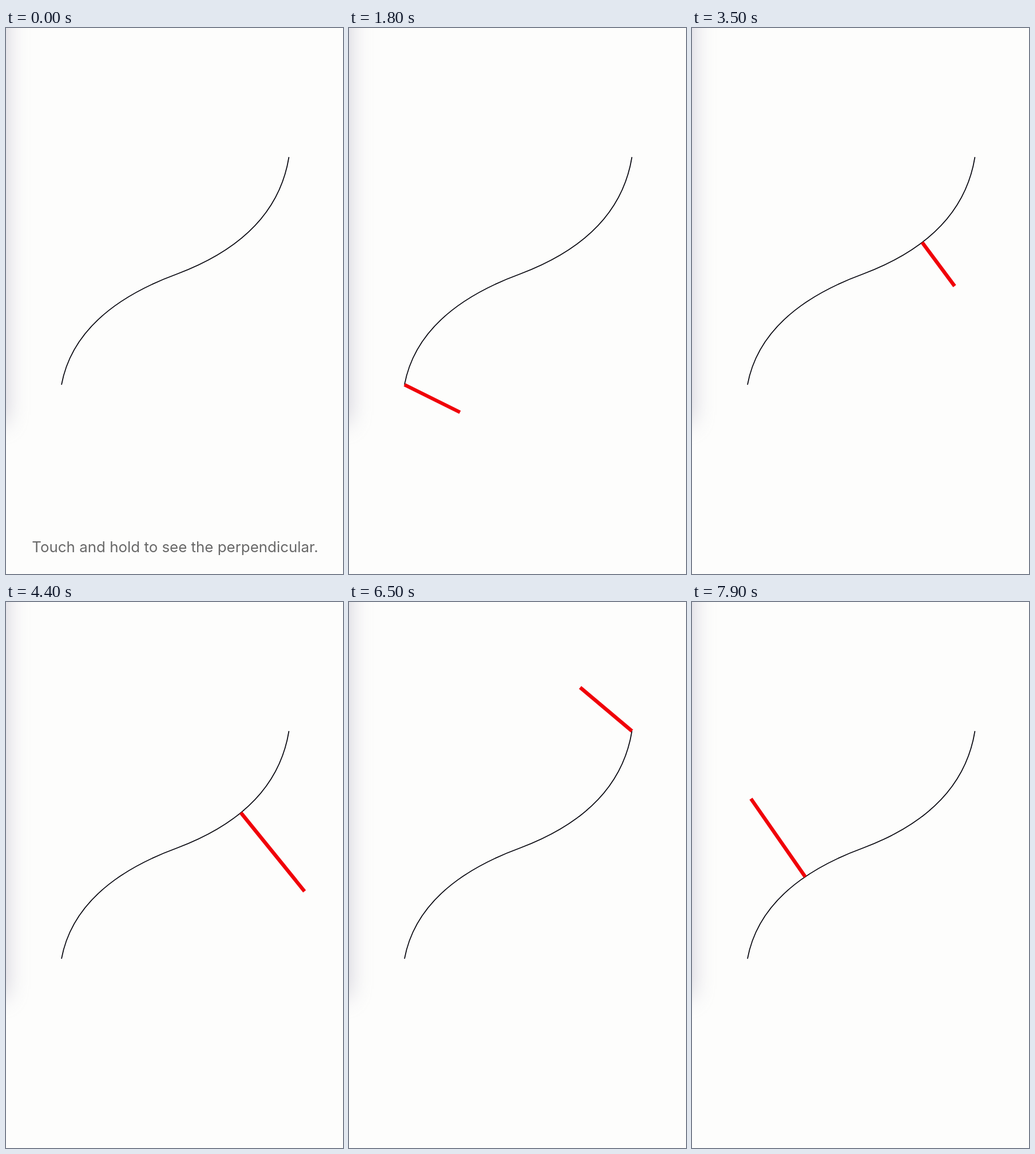
Write an HTML page that moves like this. It is 589 px wide and 952 px high and loops after 8 s.

```html
<!DOCTYPE html>
<html lang="en">
<head>
<meta charset="utf-8">
<title>Perpendicular to a curve</title>
<style>
html, body { margin: 0; width: 100%; height: 100%; overflow: hidden; background: #fdfdfc; }
#edge {
  position: absolute; left: -100px; top: -100px; width: 100px; height: 788px;
  box-shadow: 0 0 38px rgba(150, 146, 172, .45);
}
svg { position: absolute; left: 0; top: 0; }
text { font: 25.9px Inter, Roboto, sans-serif; fill: #686868; text-anchor: middle; }
</style>
</head>
<body>
<div id="edge"></div>
<svg width="589" height="952" viewBox="0 0 589 952">
  <path id="curve" fill="none" stroke="#080810" stroke-width="1.7"/>
  <line id="ruler" stroke="#f00008" stroke-width="6.4"/>
  <text id="hint" x="295.5" y="914">Touch and hold to see the perpendicular.</text>
</svg>
<script>
const LOOP = 8000, STEP = 100, TOUCH_START = 600, DIVISIONS = 57;
const curve = document.getElementById('curve');
const ruler = document.getElementById('ruler');
const hint = document.getElementById('hint');

// Two quadratic arcs: start, control, joint, control, end
const knots = [[97, 622], [121, 494], [300, 428.5], [472, 363.5], [494.5, 225]];
curve.setAttribute('d', `M${knots[0]}Q${knots.slice(1, 3)}Q${knots.slice(3)}`);

// Finger path: time, x, y at its turning points
const touch = [
  [TOUCH_START, 252, 787], [1800, 194, 670], [2500, 247, 550],
  [3500, 459, 450], [4500, 526, 510], [5100, 531, 524],
  [5750, 576, 350], [6500, 404, 149], [7900, 103, 343]
];

const samples = [];
for (const first of [0, 2]) {
  const [a, b, c] = knots.slice(first, first + 3);
  for (let i = 0; i <= DIVISIONS; i++) {
    const u = i / DIVISIONS, v = 1 - u;
    samples.push([0, 1].map(k => v * v * a[k] + 2 * u * v * b[k] + u * u * c[k]));
  }
}

function slope(i, axis) {
  const a = touch[Math.max(i - 1, 0)];
  const b = touch[Math.min(i + 1, touch.length - 1)];
  return (b[axis] - a[axis]) / (b[0] - a[0]);
}

// Cubic Hermite through the finger path
function fingerAt(t) {
  let i = 0;
  while (i < touch.length - 2 && touch[i + 1][0] <= t) i++;
  const a = touch[i], b = touch[i + 1], span = b[0] - a[0];
  const u = (t - a[0]) / span, v = 1 - u;
  return [1, 2].map(k =>
    v * v * (1 + 2 * u) * a[k] + u * u * (1 + 2 * v) * b[k] +
    span * u * v * (v * slope(i, k) - u * slope(i + 1, k)));
}

function nearest(x, y) {
  const distance = p => Math.hypot(p[0] - x, p[1] - y);
  return samples.reduce((best, p) => distance(p) < distance(best) ? p : best);
}

function draw(now) {
  const t = Math.floor(now % LOOP / STEP) * STEP;
  hint.style.opacity = Math.min(1, Math.max(0, (500 - t) / 400));
  ruler.style.display = t < TOUCH_START ? 'none' : '';
  if (t < TOUCH_START) return;
  const [x2, y2] = fingerAt(t), [x1, y1] = nearest(x2, y2);
  for (const [key, value] of Object.entries({ x1, y1, x2, y2 })) ruler.setAttribute(key, value);
}

const start = performance.now();
function tick() {
  draw(performance.now() - start);
  requestAnimationFrame(tick);
}
tick();
</script>
</body>
</html>
```
